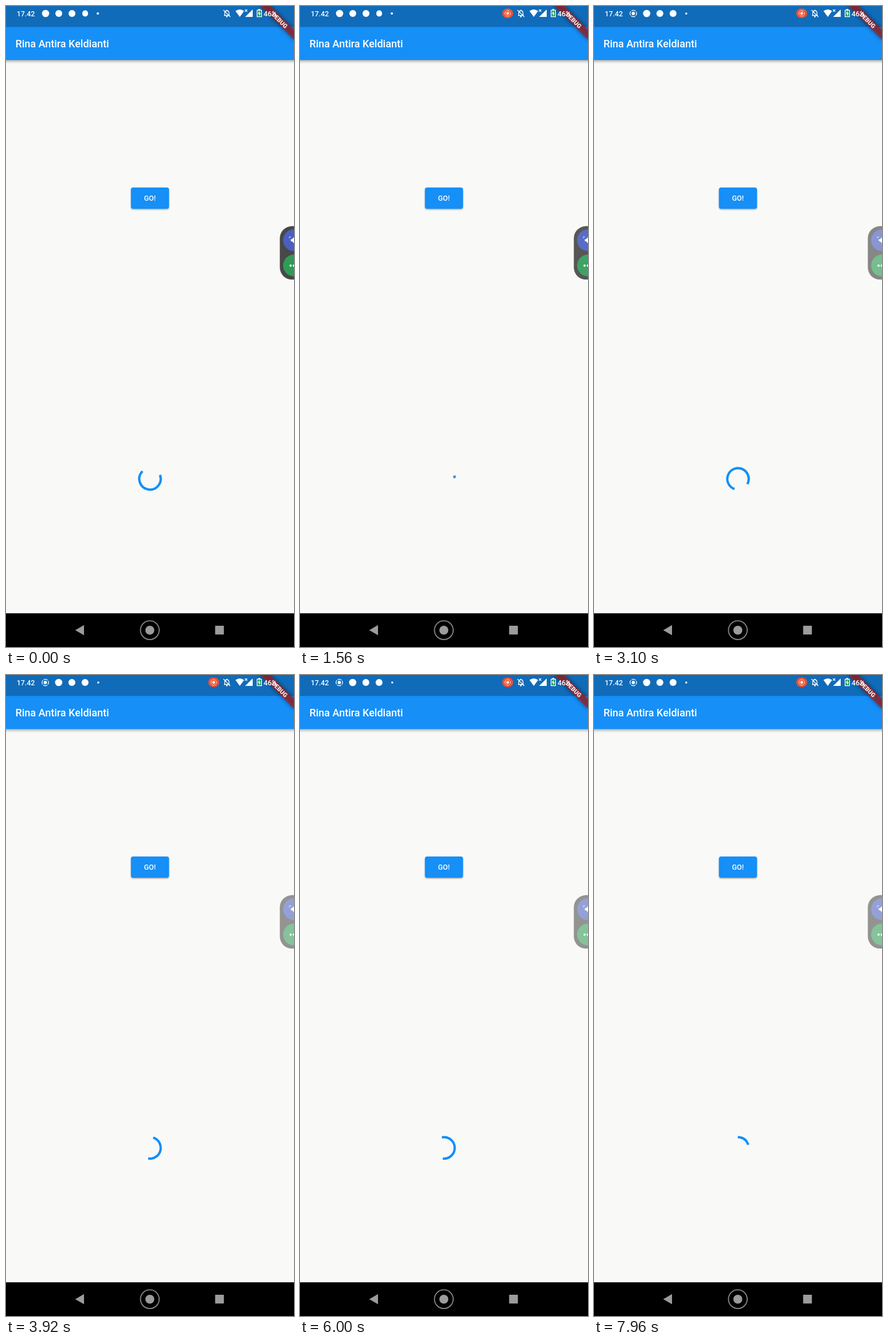
An HTML page that plays this animation: 502 px wide and 1116 px high, repeating every 8 s.

```html
<!DOCTYPE html>
<html lang="id">
<head>
<meta charset="utf-8">
<title>Loading screen</title>
<style>
  html, body { margin: 0; width: 100%; height: 100%; overflow: hidden; background: #f9f9f8; }
  svg { display: block; width: 100%; height: 100%; font-family: Roboto, sans-serif; }
  text { fill: #fff; }

  #chip, #bubble, #slide, #square, #dot, #castIcon { animation: 8s linear infinite; }
  #chip { animation-name: chip; }
  #bubble { animation-name: dim; }
  #slide { animation-name: slide; }
  #square { animation-name: shrink; transform-origin: 138px 13px; }
  #dot { animation-name: swap; }
  #castIcon { animation-name: pop; transform-origin: 68.5px 13px; }

  @keyframes chip { 0%, 3.5% { opacity: 0 } 10.5%, 100% { opacity: 1 } }
  @keyframes dim { 0%, 13.75% { opacity: 1 } 43.75%, 100% { opacity: .573 } }
  @keyframes slide {
    0%, 26% { transform: none; animation-timing-function: cubic-bezier(.4, 0, .2, 1) }
    33%, 100% { transform: translateX(22.8px) }
  }
  @keyframes shrink {
    0%, 26% { transform: none }
    29%, 100% { transform: scale(.33) }
  }
  @keyframes swap { 0%, 26% { opacity: 1 } 28%, 100% { opacity: 0 } }
  @keyframes pop {
    0%, 27.8% { opacity: 0; transform: scale(.85); animation-timing-function: cubic-bezier(.4, 0, .2, 1) }
    34.7%, 100% { opacity: 1; transform: none }
  }
</style>
</head>
<body>
<svg viewBox="0 0 502 1116" preserveAspectRatio="none">
  <defs>
    <filter id="barShadow" x="-5%" y="-30%" width="110%" height="170%">
      <feDropShadow dx="0" dy="2" stdDeviation="2.4" flood-opacity=".38"/>
    </filter>
    <filter id="buttonShadow" x="-20%" y="-30%" width="140%" height="180%">
      <feDropShadow dx="0" dy="1.4" stdDeviation="1.3" flood-opacity=".34"/>
    </filter>
    <filter id="soft" x="-20%" y="-100%" width="140%" height="300%">
      <feGaussianBlur stdDeviation="3.5"/>
    </filter>
  </defs>

  <rect width="502" height="1116" fill="#f9f9f8"/>

  <!-- app bar and status strip -->
  <rect x="-10" y="-10" width="522" height="104" fill="#148ff7" filter="url(#barShadow)"/>
  <rect width="502" height="36.5" fill="#106bb9"/>
  <text x="16.5" y="72" font-size="18" font-weight="500">Rina Antira Keldianti</text>

  <g filter="url(#buttonShadow)">
    <rect x="217.7" y="316" width="66.5" height="37" rx="4" fill="#148ff7"/>
  </g>
  <text x="250.8" y="339" font-size="12.5" font-weight="500" text-anchor="middle">GO!</text>

  <path id="spinner" fill="none" stroke="#128ff8" stroke-width="4.15" stroke-linecap="square"/>

  <!-- corner banner -->
  <g transform="translate(502 0) rotate(45) scale(1.0367)">
    <rect x="-40" y="28" width="80" height="12" opacity=".5" filter="url(#soft)"/>
    <rect x="-40" y="28" width="80" height="12" fill="#b71c1c" fill-opacity=".66"/>
    <text x="0" y="37.7" font-size="10.2" font-weight="900" text-anchor="middle" fill-opacity=".92">DEBUG</text>
  </g>

  <!-- status icons -->
  <g fill="#fff">
    <text x="18.7" y="17.5" font-size="12.4" font-weight="500">17.42</text>
    <g id="castIcon">
      <circle cx="68.5" cy="13" r="5.7" fill="none" stroke="#fff" stroke-width="1.3" stroke-dasharray="7.4 1.55" stroke-dashoffset="3.7"/>
      <circle cx="68.5" cy="13" r="2.9"/>
    </g>
    <g id="slide">
      <circle cx="69" cy="13" r="6.3"/>
      <circle cx="92" cy="13" r="6"/>
      <circle cx="115" cy="13" r="6"/>
      <rect id="square" x="133" y="7.5" width="10" height="11" rx="5" ry="5"/>
    </g>
    <circle id="dot" cx="160" cy="13" r="2"/>

    <g id="chip">
      <rect x="352.5" y="4.5" width="19" height="16.5" rx="8.2" fill="#f2502f"/>
      <circle cx="362" cy="12.8" r="4.8" fill="none" stroke="#fff" stroke-opacity=".85" stroke-width="1" stroke-dasharray="6.4 1.14" stroke-dashoffset="3.2"/>
      <circle cx="362" cy="12.8" r="2.4"/>
    </g>

    <g fill="none" stroke="#fff" stroke-width="1.3">
      <path d="M380 16.5h10M381.3 16.5v-4q0-4 3.7-4.5q3.7.5 3.7 4.5v4M385 8v-1.5M379 7l12 12"/>
      <path d="M416.5 6l4 4m0-4l-4 4" stroke-width="1.1"/>
    </g>
    <circle cx="385" cy="18.4" r="1.3"/>
    <path d="M400 8.7Q407.5 3.5 415 8.7L407.5 19ZM430 6v13h-13.2Z"/>
    <path d="M439.7 5.2h3.6v1.6h2.7v12.4h-9v-12.4h2.7Z"/>
    <rect x="438.2" y="8" width="6.6" height="10" fill="#2d9a68"/>
    <path d="M442 8.5l-3 5h2v4l3-5h-2Z"/>
    <text x="449" y="17.5" font-size="12.4" font-weight="500">46%</text>
  </g>

  <!-- floating side panel -->
  <g id="bubble">
    <rect x="477.3" y="383.3" width="50" height="93" rx="21" fill="#484848"/>
    <circle cx="502" cy="407.7" r="19" fill="#4a60c1"/>
    <circle cx="502" cy="451.8" r="19" fill="#2f9c56"/>
    <path d="M496.5 406h2l3.5-3.5v10.5l-3.5-3.5h-2Z" fill="#fff"/>
    <path d="M494 404.5v-2.5h3" fill="none" stroke="#fff" stroke-opacity=".75" stroke-width="1.1"/>
    <circle cx="496" cy="452" r="1.9" fill="#fff"/>
    <circle cx="501.6" cy="452" r="1.9" fill="#fff"/>
  </g>

  <!-- navigation -->
  <rect y="1057.3" width="502" height="59" fill="#000"/>
  <g fill="#9c9c9c">
    <path d="M120.7 1086.7L136 1077.8v17.8Z"/>
    <circle cx="250.7" cy="1086.7" r="7.8"/>
    <circle cx="250.7" cy="1086.7" r="16.3" fill="none" stroke="#858585" stroke-width="1.9"/>
    <rect x="364.5" y="1079" width="15.3" height="15.3" rx=".8"/>
  </g>
</svg>

<script>
  const LOOP = 8000;
  const spinner = document.getElementById('spinner');

  // The picture moves within these spans (ms) and rests in between.
  const spans = [
    [140, 860], [980, 1700], [1800, 2540], [2640, 3380], [3500, 4200],
    [4320, 5060], [5160, 5900], [6000, 6740], [6840, 7580], [7700, 7960]
  ];

  function shownTime(time) {
    let shown = 0;
    for (const [start, end] of spans) {
      if (time >= start) shown = Math.min(time, end);
    }
    return shown;
  }

  // cubic-bezier(.4, 0, .2, 1)
  function ease(x) {
    if (x <= 0) return 0;
    if (x >= 1) return 1;
    let low = 0, high = 1;
    for (let i = 0; i < 24; i++) {
      const s = (low + high) / 2;
      if (s * (1.2 + s * (-1.8 + s * 1.6)) < x) low = s; else high = s;
    }
    return low * low * (3 - 2 * low);
  }

  function pointAt(degrees) {
    const a = degrees * Math.PI / 180;
    return (251 + 18.66 * Math.sin(a)).toFixed(3) + ' ' + (823.3 - 18.66 * Math.cos(a)).toFixed(3);
  }

  function drawSpinner(time) {
    const cycles = 1.599 + 0.00027 * time;
    const phase = cycles % 1;
    const head = ease(phase * 2);
    const tail = ease(phase * 2 - 1);
    const start = 270 * tail + 216 * cycles + 90 * phase;
    const sweep = Math.max(270 * (head - tail), 0.3);
    spinner.setAttribute('d',
      `M${pointAt(start)}A18.66 18.66 0 ${sweep > 180 ? 1 : 0} 1 ${pointAt(start + sweep)}`);
  }

  const origin = performance.now();
  function tick() {
    drawSpinner(shownTime((performance.now() - origin) % LOOP));
    requestAnimationFrame(tick);
  }
  tick();
</script>
</body>
</html>
```
